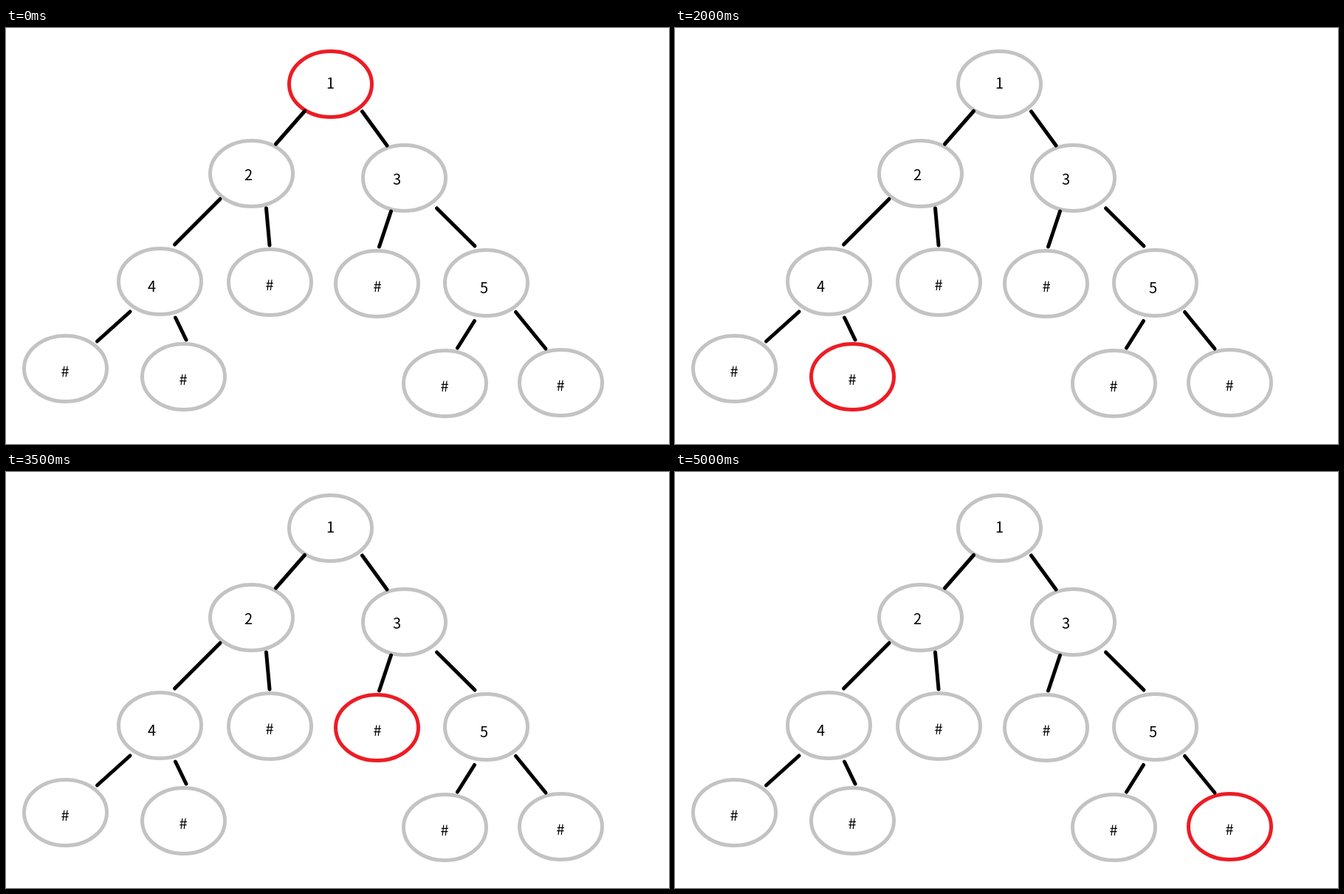
Animation of 898 by 563 pixels, one loop 5.5 s. Source, as an HTML page with a canvas:

```html
<!DOCTYPE html>
<html lang="en">
<head>
<meta charset="utf-8">
<title>Preorder traversal</title>
<style>
  html, body { margin: 0; width: 100%; height: 100%; overflow: hidden; background: #fff; }
  canvas { display: block; }
</style>
</head>
<body>
<canvas id="stage" width="898" height="563"></canvas>
<script>
const ctx = document.getElementById('stage').getContext('2d');
const STEP = 500;

// Nodes in visiting order: ring centre, label, label centre
const nodes = [
  [439.5, 76, '1', 439.5, 75],
  [332.5, 197, '2', 328.5, 199],
  [208.5, 343, '4', 197.5, 350],
  [80.5, 461, '#', 80, 465],
  [240.5, 472, '#', 240, 476],
  [357.5, 344, '#', 357, 348],
  [539.5, 203, '3', 529.5, 205],
  [502.5, 346, '#', 503, 350],
  [650.5, 345, '5', 647.5, 352],
  [594.5, 481, '#', 594, 485],
  [751.5, 480, '#', 751, 484]
];

const edges = [
  [404.5, 112.5, 365.5, 157], [482.5, 113, 516, 159],
  [290, 231.5, 228.5, 293], [352.5, 244, 357, 294],
  [521.5, 248, 505.5, 296], [583.5, 244, 635, 295],
  [168, 384, 123.5, 424], [229.5, 392, 244, 422],
  [634.5, 396.5, 611.5, 433], [690.5, 384.5, 731, 434]
];

function ring(x, y, color) {
  ctx.strokeStyle = color;
  ctx.beginPath();
  ctx.ellipse(x, y, 56, 44.5, 0, 0, Math.PI * 2);
  ctx.stroke();
}

function draw(active) {
  ctx.fillStyle = '#fff';
  ctx.fillRect(0, 0, 898, 563);
  ctx.lineWidth = 5;
  ctx.lineCap = 'round';
  nodes.forEach(([x, y], i) => ring(x, y, i === active ? '#ed1c24' : '#c3c3c3'));

  ctx.strokeStyle = '#000';
  ctx.beginPath();
  for (const [x1, y1, x2, y2] of edges) {
    ctx.moveTo(x1, y1);
    ctx.lineTo(x2, y2);
  }
  ctx.stroke();

  ctx.fillStyle = '#000';
  ctx.font = '20px "Noto Sans CJK SC", "Noto Sans CJK JP", "Noto Sans", sans-serif';
  ctx.textAlign = 'center';
  ctx.textBaseline = 'alphabetic';
  for (const [, , label, x, y] of nodes) ctx.fillText(label, x, y + 7);
}

const start = performance.now();

function tick(now) {
  const t = Math.max(0, now - start);
  draw(Math.floor(t / STEP) % nodes.length);
  requestAnimationFrame(tick);
}

draw(0);
requestAnimationFrame(tick);
</script>
</body>
</html>
```
